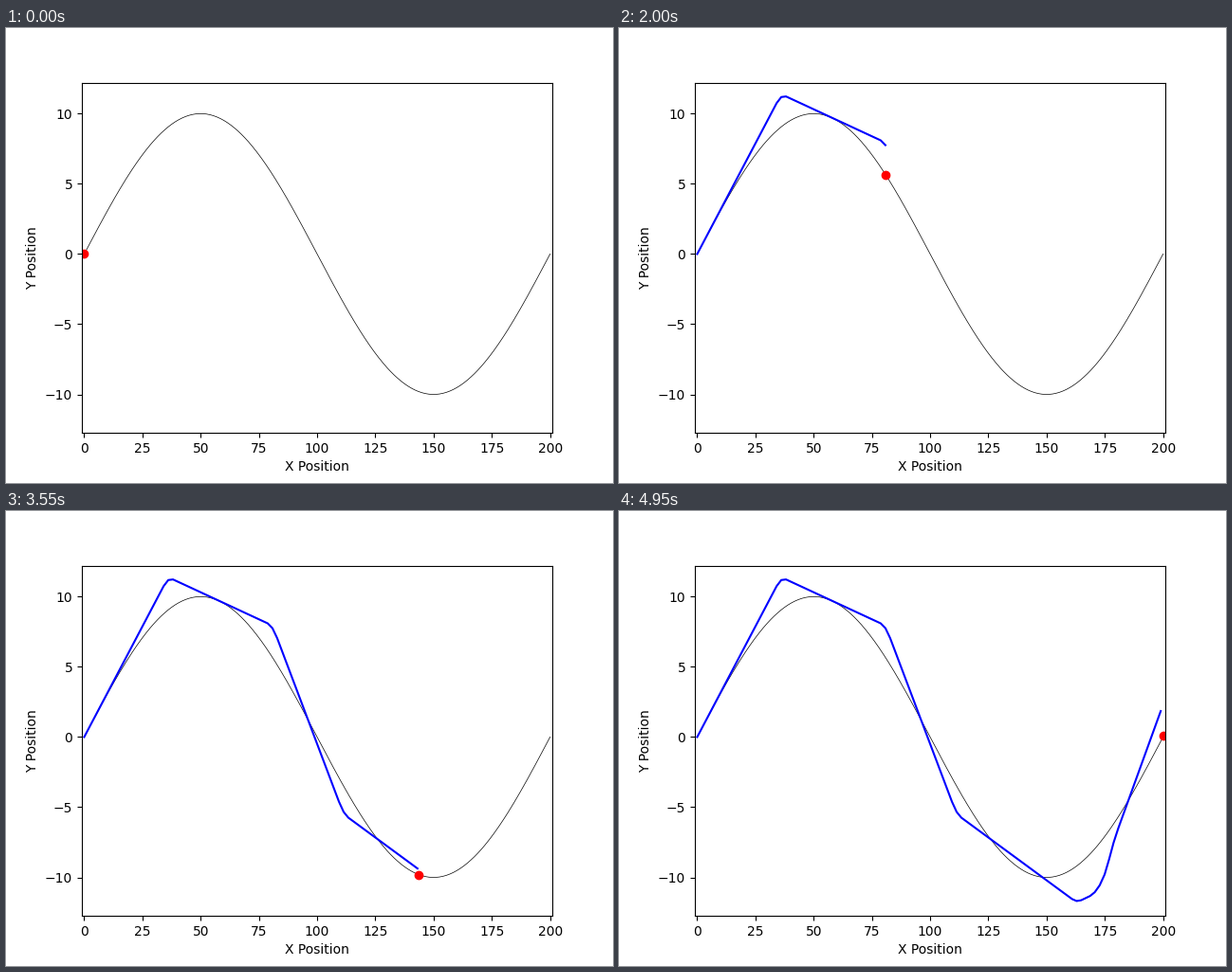
A matplotlib script that plays this animation: 640 by 480 pixels, repeating every 5000 ms.

```python
import numpy as np
import matplotlib.pyplot as plt
from matplotlib.animation import FuncAnimation

FRAMES = 100
INTERVAL = 50
LENGTH = 200
GOAL_STEP = 2.0225

# Turning points of the tracked path: step, x, y
TURNS = [
    (0, 0, 0), (18, 36.1, 11.38), (40, 80.8, 7.94), (55, 111.4, -5.5),
    (81, 162.9, -11.78), (85, 170.6, -11.17), (87, 175.0, -9.95),
    (89, 178.7, -7.45), (99, 199.0, 1.85),
]


def ref_y(x):
    return 10 * np.sin(2 * np.pi * x / LENGTH)


def round_turns(p):
    """Soften each turn over its neighbouring steps; ends stay put."""
    inner = (p[:-2] + 2 * p[1:-1] + p[2:]) / 4
    return np.concatenate([p[:1], inner, p[-1:]])


steps = np.arange(FRAMES)
turn_step, turn_x, turn_y = np.transpose(TURNS)
path_x = round_turns(np.interp(steps, turn_step, turn_x))
path_y = round_turns(np.interp(steps, turn_step, turn_y))

fig, ax = plt.subplots(figsize=(6.4, 4.8), dpi=100)
ax.set_xlim(-1, 200.96)
ax.set_ylim(-12.745, 12.21)
ax.set_xlabel("X Position")
ax.set_ylabel("Y Position")

ref_x = np.linspace(0, LENGTH, 401)
ax.plot(ref_x, ref_y(ref_x), "k-", lw=0.5)
track, = ax.plot([], [], "b-", lw=1.5)
goal, = ax.plot([], [], "ro", ms=6)


def update(i):
    x = GOAL_STEP * i
    track.set_data(path_x[:i + 1], path_y[:i + 1])
    goal.set_data([x], [ref_y(x)])
    return track, goal


anim = FuncAnimation(fig, update, frames=FRAMES, interval=INTERVAL,
                     repeat=True, repeat_delay=0)
plt.show()
```
